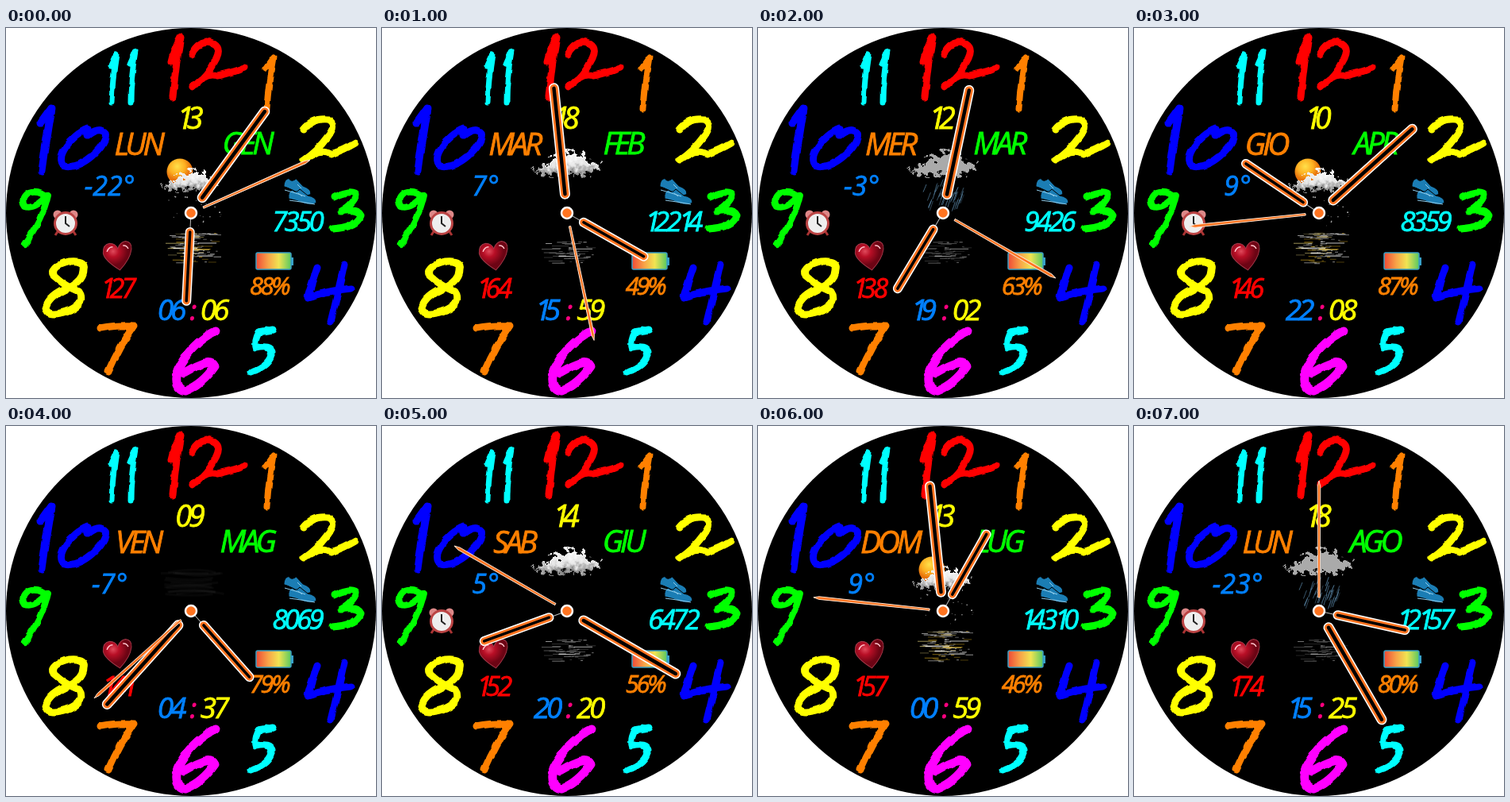
Animation of 466x466 px, one loop 8 s. Source, as an HTML page:

```html
<!DOCTYPE html>
<html lang="it">
<head>
<meta charset="utf-8">
<title>Watch face</title>
<style>
  html, body { margin: 0; width: 100%; height: 100%; overflow: hidden; background: #fff; }
  svg { display: block; width: 100vw; height: 100vh; }
  text {
    font: italic 34px "Open Sans", Lato, sans-serif;
    letter-spacing: -.11em; text-anchor: middle;
    fill: var(--c); stroke: var(--c); stroke-width: .8;
  }
  #temp { letter-spacing: 0; }
  .one { letter-spacing: -.23em; }
  .numerals, .hand { fill: none; stroke-linecap: round; stroke-linejoin: round; }
  .numerals { stroke-width: 9; }
</style>
</head>
<body>
<svg viewBox="0 0 466 466">
  <defs>
    <filter id="brush">
      <feTurbulence type="fractalNoise" baseFrequency=".06" numOctaves="2" seed="4"/>
      <feDisplacementMap in="SourceGraphic" scale="5" xChannelSelector="R" yChannelSelector="G"/>
    </filter>
    <filter id="wisp">
      <feTurbulence type="fractalNoise" baseFrequency=".14" numOctaves="4" seed="8"/>
      <feDisplacementMap in="SourceGraphic" scale="24" xChannelSelector="R" yChannelSelector="G"/>
    </filter>
    <radialGradient id="sunFill" cx=".4" cy=".3">
      <stop stop-color="#ffe04a"/><stop offset=".6" stop-color="#fdb022"/><stop offset="1" stop-color="#e8740c"/>
    </radialGradient>
    <radialGradient id="heartFill" cx=".35" cy=".3">
      <stop stop-color="#e04a5c"/><stop offset=".4" stop-color="#b80f26"/><stop offset="1" stop-color="#6c0414"/>
    </radialGradient>
    <linearGradient id="batteryFill">
      <stop stop-color="#ee4a36"/><stop offset=".35" stop-color="#f8a448"/>
      <stop offset=".65" stop-color="#f0e452"/><stop offset="1" stop-color="#58c860"/>
    </linearGradient>
    <linearGradient id="cloudFill" x2="0" y2="1">
      <stop stop-color="#fff"/><stop offset=".6" stop-color="#e4e4e4"/><stop offset="1" stop-color="#777"/>
    </linearGradient>
    <path id="cloud" filter="url(#wisp)" d="M189 181Q199 175 208 172Q214 160 227 165Q237 149 247 160Q256 158 260 169Q268 165 270 173Q278 176 271 181Q230 190 189 181Z"/>
    <path id="shoe" d="M-17 2Q-18-8-12-9Q-8-4-3-10L7-2Q18 0 18 7Q12 11 2 8Q-6 4-17 2Z"/>
  </defs>

  <circle cx="233" cy="233" r="233"/>

  <g class="numerals" filter="url(#brush)">
    <path stroke="#f00" d="M208 43Q212 25 220 11Q214 45 210 87M234 34Q239 19 254 18Q273 21 265 38Q255 59 236 74Q252 55 266 60Q283 57 300 50"/>
    <path stroke="#ff8000" stroke-width="7" d="M327 51L337 37Q331 70 329 101"/>
    <path stroke="#ff0" d="M375 127Q386 113 405 115Q418 121 405 137Q392 155 375 166Q396 151 409 159Q425 154 440 145"/>
    <path stroke="#0f0" d="M413 213Q432 204 441 208Q441 220 422 231Q443 227 447 236Q442 251 411 253"/>
    <path stroke="#00f" d="M392 302Q385 322 380 339Q410 330 434 328M426 298Q417 338 409 370"/>
    <path stroke="#0ff" d="M336 380L318 383Q312 394 314 403Q334 399 335 408Q333 425 309 433"/>
    <path stroke="#f0f" stroke-width="11" d="M264 382Q233 397 216 431Q211 455 226 457Q247 449 263 426Q258 414 224 434"/>
    <path stroke="#ff8000" d="M119 378Q142 374 161 375Q144 399 129 433"/>
    <path stroke="#ff0" d="M98 305Q101 292 80 294Q54 300 61 313Q74 325 92 332Q101 345 81 355Q53 366 50 353Q54 337 82 326Q98 317 98 305"/>
    <path stroke="#0f0" stroke-width="8" d="M50 213Q42 204 28 208Q17 216 24 225Q37 229 53 210Q46 242 24 272"/>
    <path stroke="#00f" d="M44 119L57 101Q50 142 45 180M103 127C82 135 60 164 74 174C94 180 130 146 125 132Q118 124 103 135"/>
    <path stroke="#0ff" stroke-width="7" d="M132 48L139 33Q134 65 133 94M156 45L163 29Q157 64 157 94"/>
  </g>

  <g id="sky"></g>

  <g id="alarm" transform="translate(75 246)">
    <path d="M-9 9L-13 15M9 9L13 15" stroke="#a33" stroke-width="3"/>
    <circle cx="-10" cy="-11" r="5.5" fill="#d88"/><circle cx="10" cy="-11" r="5.5" fill="#d88"/>
    <circle r="13.5" fill="#eee" stroke="#b44" stroke-width="3"/>
    <path d="M0-9V0L5 4" fill="none" stroke="#222" stroke-width="2"/>
  </g>
  <g fill="#1b7db4" stroke="#000">
    <use href="#shoe" transform="translate(367 200) rotate(8)"/>
    <use href="#shoe" transform="translate(373 213)"/>
    <path d="M351 204l14 4l12 4M357 217q16 2 32 5M367 197l5 5m-4 6l5 4" fill="none" stroke="#8fcdec"/>
  </g>
  <g transform="rotate(-8 141 287)">
    <path d="M141 305Q123 290 123 281Q124 270 133 270Q140 271 142 278Q146 270 153 270Q161 272 159 281Q156 293 141 305Z" fill="url(#heartFill)" stroke="#a33848"/>
    <path d="M128 280q3-6 8-5m13 0q5 0 6 5" fill="none" stroke="#ffc4cc" stroke-width="1.5"/>
  </g>
  <rect x="359" y="289" width="3" height="10" fill="#37a0c8"/>
  <rect x="315" y="283" width="44" height="21" rx="2" fill="url(#batteryFill)" stroke="#3aa0c4" stroke-width="1.5"/>

  <g id="labels"></g>

  <g id="hour" class="hand"></g>
  <g id="minute" class="hand"></g>
  <path id="second" d="M-1.2-17L-1.8-157L0-164L1.8-157L1.2-17Z" fill="#ff7420" stroke="#ffe6d4" stroke-width=".9"/>
  <circle cx="233" cy="233" r="7" fill="#ff7420" stroke="#fff" stroke-width="2.5"/>
</svg>
<script>
const $ = id => document.getElementById(id);

// field: [x, baseline, font size, colour]
const fields = {
  day: [166, 160, 39, '#ff8000'],
  date: [230, 127, 38, '#ff0'],
  month: [303, 159, 39, '#0f0'],
  temp: [130, 211, 34, '#0080ff'],
  steps: [366, 256, 35, '#0ff'],
  pulse: [140, 340, 34, '#f00'],
  battery: [331, 336, 31, '#ff8000'],
  hh: [207, 368, 37, '#0080ff'],
  colon: [234, 368, 35, '#ff0080'],
  mm: [261, 368, 37, '#ff0']
};

const names = ['day', 'date', 'month', 'temp', 'steps', 'pulse', 'battery', 'hh', 'mm', 'ss', 'sky', 'alarm'];
const states = [
  'LUN 13 GEN -22° 7350 127 88% 06 06 11 sun on',
  'MAR 18 FEB 7° 12214 164 49% 15 59 28 cloud on',
  'MER 12 MAR -3° 9426 138 63% 19 02 20 rain on',
  'GIO 10 APR 9° 8359 146 87% 22 08 44 sun on',
  'VEN 09 MAG -7° 8069 141 79% 04 37 38 fog off',
  'SAB 14 GIU 5° 6472 152 56% 20 20 50 cloud on',
  'DOM 13 LUG 9° 14310 157 46% 00 59 46 sun off',
  'LUN 18 AGO -23° 12157 174 80% 15 25 00 rain on'
].map(row => {
  const values = row.split(' ');
  return { colon: ':', ...Object.fromEntries(names.map((name, i) => [name, values[i]])) };
});

// Repeats a mark n times, handing it a seeded random function.
function scatter(n, seed, mark) {
  const random = () => (seed = seed * 16807 % 2147483647) / 2147483647;
  return Array.from({ length: n }, () => mark(random)).join('');
}

// Ripples crowd towards the middle of the reflection.
const water = (n, colours, top) => scatter(n, 4711, r => {
  const x = 236 + (r() + r() - 1) * 33, y = top + r() * (297 - top);
  const half = Math.min(1 + r() * r() * 17, 35 - Math.abs(x - 236));
  return `<path d="M${x - half} ${y}h${2 * half}" stroke="${colours[Math.floor(r() * colours.length)]}" stroke-width=".8" opacity="${.4 + r() * .6}"/>`;
});
const stars = scatter(22, 77, r =>
  `<circle cx="${205 + r() * 66}" cy="${212 + r() * 38}" r="${.4 + r() * .6}" fill="#aaa"/>`);
const rain = scatter(40, 93, r =>
  `<path d="M${212 + r() * 48} ${190 + r() * 30}l-4 ${8 + r() * 6}" stroke="#5f8eb0" opacity="${.3 + r() * .6}"/>`);
const fog = scatter(14, 31, r =>
  `<path d="M${195 + r() * 20} ${183 + r() * 32}q35 ${r() * 14 - 7} 60 0" fill="none" stroke="#777" stroke-width="3" opacity=".06"/>`);

const skies = {
  sun: `<circle cx="219" cy="181" r="16.5" fill="url(#sunFill)"/>
    <use href="#cloud" fill="url(#cloudFill)" transform="translate(34 47) scale(.85)"/>` +
    stars + water(100, ['#fff', '#ddd', '#d8c878', '#e0b020'], 258),
  cloud: '<use href="#cloud" fill="url(#cloudFill)"/>' + water(50, ['#ddd', '#777'], 269),
  rain: '<use href="#cloud" fill="#aaa"/>' + rain + water(50, ['#aaa', '#555'], 269),
  fog
};

const capsule = (length, width) =>
  [['#fff', width], ['#ff7420', width - 3], ['#000', width - 8.5]].map(([colour, w]) =>
    `<path d="M0-24V${6 - length}" stroke="${colour}" stroke-width="${w}"/>`).join('');

$('hour').innerHTML = '<path d="M0-8V-18" stroke="#bbb"/>' + capsule(117, 12);
$('minute').innerHTML = capsule(164, 13);
$('labels').innerHTML = Object.entries(fields).map(([name, [x, y, size, colour]]) =>
  `<text id="${name}" x="${x}" y="${y}" style="--c:${colour};font-size:${size}px"></text>`).join('');

const turn = (id, angle) => $(id).setAttribute('transform', `translate(233 233) rotate(${angle})`);

function show(state) {
  for (const name in fields)
    $(name).innerHTML = state[name].replace(/1/g, '<tspan class="one">1</tspan>');
  $('sky').innerHTML = skies[state.sky];
  $('alarm').style.display = state.alarm === 'on' ? '' : 'none';
  turn('hour', state.hh * 30 + state.mm / 2);
  turn('minute', state.mm * 6);
  turn('second', state.ss * 6);
}

let shown = -1;
function tick() {
  const index = Math.floor(performance.now() / 1000) % states.length;
  if (index !== shown) show(states[shown = index]);
  requestAnimationFrame(tick);
}
tick();
</script>
</body>
</html>
```
